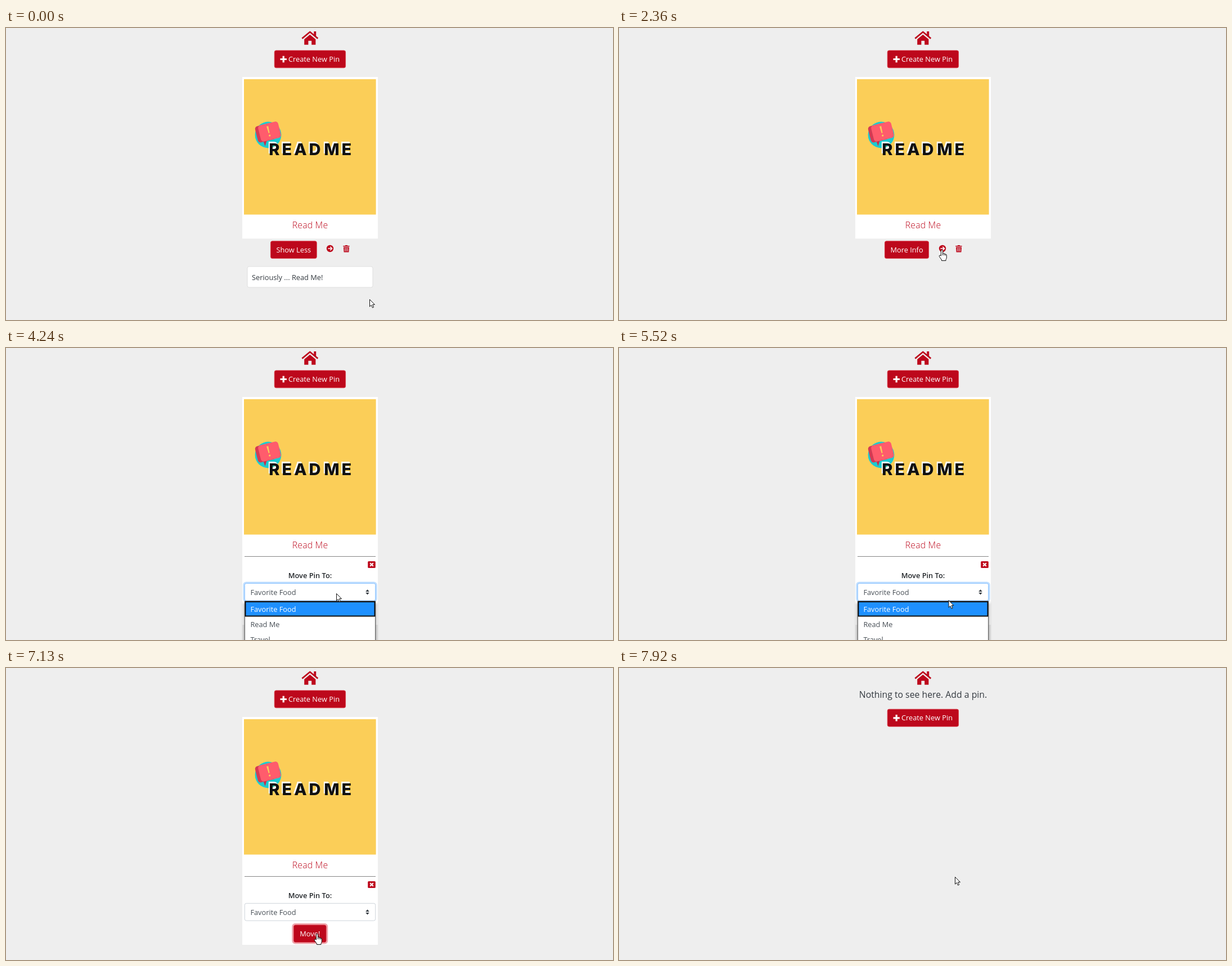
An HTML page that plays this animation: 1079 px wide and 519 px high, repeating every 8 s.

```html
<!DOCTYPE html>
<html lang="en">
<head>
<meta charset="utf-8">
<title>Pin board</title>
<style>
  html, body { margin: 0; width: 100%; height: 100%; overflow: hidden; background: #eee; }
  svg { display: block; width: 1079px; height: 519px; }
  text { font: 12.8px "Open Sans", "Noto Sans", sans-serif; fill: #343a40; }
  .red { fill: #bd081c; }
  .button { fill: #bd081c; stroke: #dc3545; stroke-width: .8; }
  .label { fill: #fff; }
  .mid { text-anchor: middle; }
  .big { font-size: 15.8px; }
  .title { font-size: 15.8px; font-weight: 300; letter-spacing: .2px; fill: #bd081c; }
  .field { fill: #495057; }
  .poster { font: 800 29px Inter, "Open Sans", sans-serif; letter-spacing: 4px; word-spacing: -8.6px; }
</style>
</head>
<body>
<svg viewBox="0 0 1079 519" xmlns="http://www.w3.org/2000/svg">
  <defs>
    <g id="icons">
      <circle cx="576" cy="392" r="6.2" class="red"/>
      <path d="M572.4 392H579M576.3 388.8L579.5 392L576.3 395.2" fill="none" stroke="#fff" stroke-width="1.6"/>
      <path class="red" d="M599.3 387H602.6L603.3 386H606.7L607.4 387H610.6V388.6H599.3ZM600 389.4H610L609.4 398.4H600.6Z"/>
      <path d="M602.7 390.8V397M605 390.8V397M607.3 390.8V397" stroke="#eee" stroke-width=".9"/>
    </g>
    <clipPath id="fold"><rect id="foldRect" x="427" y="422" width="228" height="41"/></clipPath>
    <filter id="soft" x="-10%" y="-20%" width="120%" height="140%"><feGaussianBlur stdDeviation="2"/></filter>
  </defs>
  <rect width="1079" height="519" fill="#eee"/>

  <g class="red">
    <path d="M547.3 6H551.2V15.5L547.3 12Z"/>
    <path d="M526.3 18.6L540.3 7L554.3 18.6" fill="none" stroke="#bd081c" stroke-width="2.7" stroke-linejoin="round"/>
    <path d="M530.2 20L540.3 11.7L550.4 20V29.8H543.2V22.8H537.4V29.8H530.2Z"/>
  </g>

  <text id="empty" class="mid big" x="540.5" y="53">Nothing to see here. Add a pin.</text>

  <g id="create">
    <rect x="477.2" y="39.9" width="126.4" height="30.9" rx="3" class="button"/>
    <path d="M493.2 49.8V61.2M487.5 55.5H498.9" stroke="#fff" stroke-width="3.2"/>
    <text class="label" x="502" y="60">Create New Pin</text>
  </g>

  <g id="pin">
    <rect id="card" x="420" y="87" width="241" height="287.3" fill="#fff"/>
    <rect x="423" y="91" width="234.6" height="240.6" fill="#fbce58"/>
    <circle cx="466" cy="190" r="23.4" fill="#1ccbd0"/>
    <path d="M457 200L460.5 210L464 199Z" fill="#c9304a"/>
    <g transform="rotate(-14 468.5 184)">
      <rect x="444.5" y="169.5" width="33" height="29.6" rx="5" fill="#d43a54"/>
      <rect x="450.2" y="169.2" width="36.5" height="29.6" rx="5" fill="#ff5c6c"/>
      <path d="M465.4 174H468.6L467.9 186.5H466.1Z" fill="#fbce58"/>
      <circle cx="467" cy="191" r="1.6" fill="#fbce58"/>
    </g>
    <text class="poster" x="465.3" y="223" style="fill:#fff">READ ME</text>
    <text class="poster" x="467.3" y="226" style="fill:#111">READ ME</text>
    <text class="mid title" x="540.5" y="355.7">Read Me</text>
  </g>

  <g id="less">
    <rect id="lessButton" x="470.4" y="378.8" width="81.9" height="30.8" rx="3" class="button"/>
    <text class="label mid" x="511.3" y="399">Show Less</text>
    <use href="#icons"/>
  </g>

  <g id="more">
    <rect id="moreGlow" x="470.6" y="377.1" width="81.8" height="34.2" rx="4.3" fill="none" stroke="#dc3545" stroke-opacity=".45" stroke-width="2.7"/>
    <rect x="472.4" y="378.8" width="78.2" height="30.8" rx="3" class="button"/>
    <text class="label mid" x="511.5" y="399">More Info</text>
    <use href="#icons" x="-1"/>
  </g>

  <g id="note" clip-path="url(#fold)">
    <rect x="429" y="424" width="223" height="37" rx="3" fill="#fff" stroke="#dfdfdf"/>
    <text x="437" y="447.8">Seriously ... Read Me!</text>
  </g>

  <g id="form">
    <path d="M424 370.5H657" stroke="#858585"/>
    <rect x="643.2" y="379" width="13.6" height="12" rx="1.6" class="red"/>
    <path d="M647.2 382.2L652.8 387.8M652.8 382.2L647.2 387.8" stroke="#fff" stroke-width="2.1"/>
    <text class="mid" x="540.5" y="408.6" style="font-weight:600;fill:#212529">Move Pin To:</text>
    <rect id="selectGlow" x="422.7" y="416.8" width="235.6" height="33.6" rx="4.3" fill="none" stroke="#bfdeff" stroke-width="2.7"/>
    <rect id="select" x="424.3" y="418.3" width="232.4" height="30.8" rx="3" fill="#fff" stroke="#ced4da"/>
    <text class="field" x="434.4" y="438.6">Favorite Food</text>
    <path d="M639.2 433L642.5 429.2L645.8 433ZM639.2 434.8L642.5 438.6L645.8 434.8Z" fill="#343a40"/>
    <rect id="moveGlow" x="509.7" y="455.1" width="61.2" height="34" rx="4.3" fill="none" stroke="#dc3545" stroke-opacity=".45" stroke-width="2.7"/>
    <rect x="511.4" y="456.8" width="57.8" height="30.8" rx="3" class="button"/>
    <text class="label mid" x="540.3" y="477.3">Move!</text>
  </g>

  <g id="list">
    <rect x="422" y="453" width="237" height="90" fill="#000" opacity=".3" filter="url(#soft)"/>
    <rect x="424.5" y="450" width="232" height="90" fill="#fff" stroke="#5d5d5d"/>
    <rect x="425.5" y="451" width="230" height="25.5" fill="#1e90ff" stroke="#101010" stroke-width="2"/>
    <text class="label" x="434.4" y="469.3">Favorite Food</text>
    <text class="field" x="434.4" y="496.3">Read Me</text>
    <text class="field" x="434.4" y="523.3">Travel</text>
  </g>

  <g id="cursor" fill="#fff" stroke="#111" stroke-linejoin="round">
    <path id="arrow" d="M.5 .5V13.2L3.4 10.5L5.5 15.2L7.6 14.2L5.6 9.7H9.5Z"/>
    <path id="hand" d="M-1.5 11V1.8Q-1.5 .5 0 .5T1.5 1.8V6.5Q3.5 5.7 4 7.3Q6 6.7 6.3 8.2Q8.3 8 8.3 10V14Q8.3 16 7 17.5V19.5H-.5V18L-4.5 12.5Q-5.3 10.7-4 10Q-2.8 9.6-1.5 11ZM1.5 6.5V10M4 7.3V10.2M6.3 8.2V10.5"/>
  </g>
</svg>
<script>
const LOOP = 8000, STEP = 120;
const el = id => document.getElementById(id);
const show = (id, on) => el(id).style.display = on ? "" : "none";
const within = (t, from, to) => t >= from && t < to;

// start time, number of steps, destination of the pointer tip
const moves = [
  [280, 2, 559, 427], [550, 2, 529, 398], [1460, 1, 539, 414],
  [1580, 4, 574, 401], [2090, 1, 574, 394], [2730, 1, 574, 388],
  [3010, 1, 576, 390], [3150, 1, 582, 416], [3300, 1, 587, 423],
  [3450, 1, 587, 426], [4000, 3, 587, 436], [5520, 2, 584, 460],
  [5790, 1, 583, 462], [6350, 2, 583, 472], [6620, 2, 566, 467],
  [6890, 3, 553, 472], [7380, 1, 560, 470], [7530, 3, 573, 439],
  [7920, 1, 597, 371]
];

function pointer(t) {
  let x = 646, y = 482;
  for (const [start, steps, toX, toY] of moves) {
    if (t < start) break;
    const part = Math.min(1, (Math.floor((t - start) / STEP) + 1) / steps);
    x += (toX - x) * part;
    y += (toY - y) * part;
  }
  return [x, y];
}

function draw(t) {
  const empty = t >= 7380;
  const form = within(t, 2730, 7380);
  const focused = within(t, 3570, 7010);

  show("empty", empty);
  show("pin", !empty);
  el("create").setAttribute("transform", `translate(0 ${empty ? 33.3 : 0})`);
  el("card").setAttribute("height", form ? 405 : 287.3);

  show("less", t < 1070);
  el("lessButton").style.fill = within(t, 550, 1070) ? "#b0071a" : "";
  show("more", within(t, 1070, 2730));
  el("moreGlow").style.opacity = t < 1190 ? .5 : t < 2240 ? 1 : t < 2360 ? .5 : 0;

  show("note", t < 1310);
  el("foldRect").setAttribute("height", t < 1070 ? 41 : t < 1190 ? 33 : 12);

  show("form", form);
  show("selectGlow", focused);
  el("selectGlow").style.opacity = t < 3720 || t >= 6890 ? .5 : 1;
  el("select").setAttribute("stroke", focused ? "#80bdff" : "#ced4da");
  show("moveGlow", t >= 7010);
  el("moveGlow").style.opacity = t < 7130 ? .5 : 1;
  show("list", within(t, 3570, 6070));

  const hand = within(t, 670, 1460) || within(t, 2090, 2730) || within(t, 6740, 7380);
  show("hand", hand);
  show("arrow", !hand);
  const [x, y] = pointer(t);
  el("cursor").setAttribute("transform", `translate(${x} ${y})`);
}

const origin = performance.now();
function tick() {
  draw((performance.now() - origin) % LOOP);
  requestAnimationFrame(tick);
}
tick();
</script>
</body>
</html>
```
